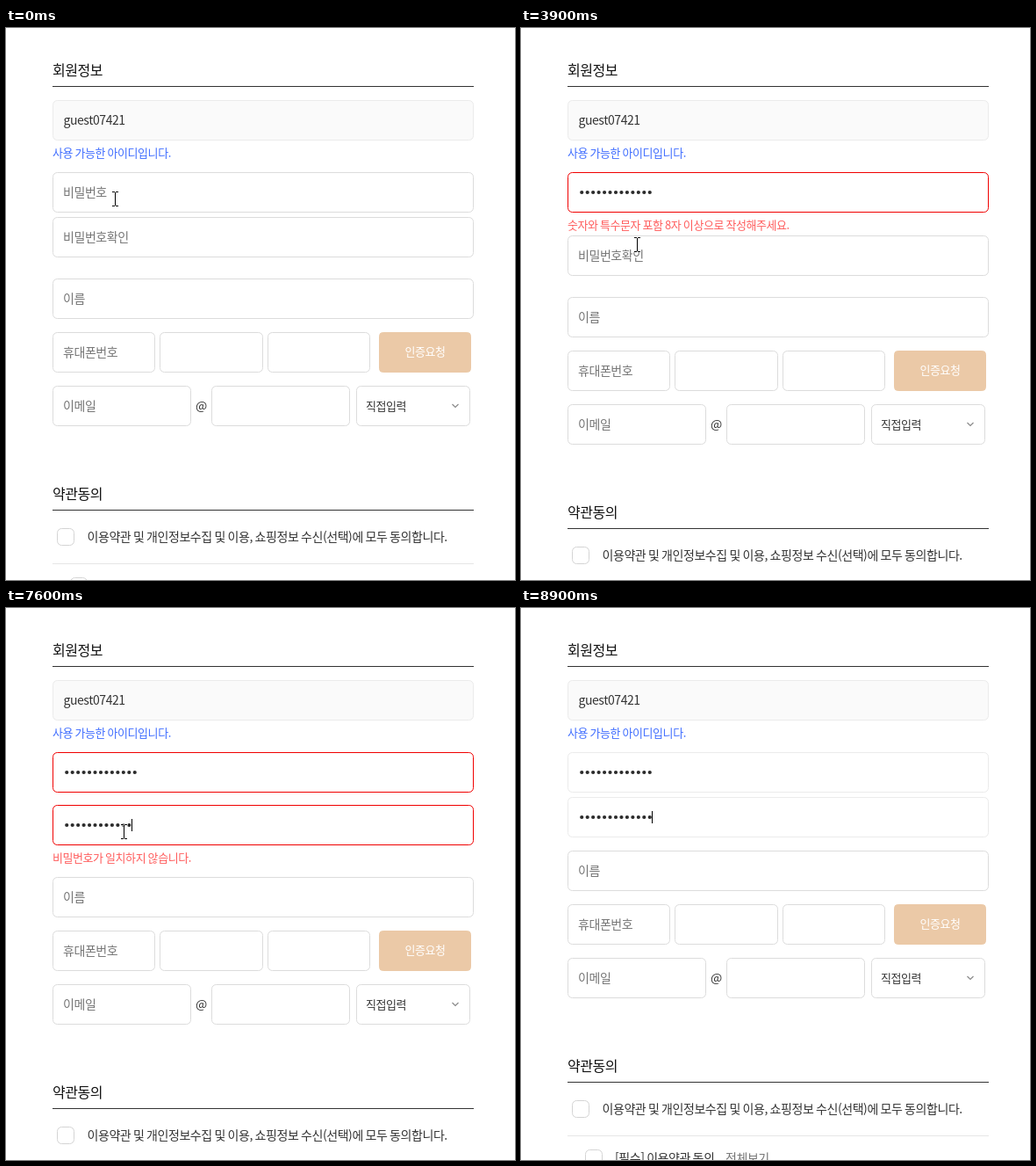
Recreate the animation shown at these times as an HTML page with a canvas. Size 580x628 px, loop 9200 ms.

```html
<!DOCTYPE html>
<html lang="ko">
<head>
<meta charset="utf-8">
<title>회원정보</title>
<style>
html, body { margin: 0; width: 100%; height: 100%; overflow: hidden; background: #fff; }
canvas { display: block; }
</style>
</head>
<body>
<canvas id="stage" width="580" height="628"></canvas>
<script>
const ctx = document.getElementById('stage').getContext('2d');
const LOOP = 9200, STEP = 100;
const FONT = '"Noto Sans CJK KR", "Noto Sans CJK", "Noto Sans", sans-serif';
const LEFT = 53, WIDTH = 480, FIELD = 46;
const GREY = '#dcdcdc', PALE = '#ebebeb', RED = '#f00000', HINT = '#757575';

// Key presses for the two password fields
const keys1 = [1400, 1500, 1600, 1700, 1800, 1900, 2000, 2000, 2700, 2800, 3000, 3100, 3100];
const keys2 = [5300, 5400, 5500, 5600, 5700, 5800, 5900, 6100, 6900, 7100, 7200, 7600, 7800];
const caretOn = [[500, 1000], [1400, 2600], [2700, 3700], [4300, 4900], [5300, 6700], [6900, 8400], [8900, LOOP]];
const SWAP = 4100, VALID = 7800;

// Error message block: top margin, line and bottom margin
const MSG = { top: 8, line: 12, bottom: 1 };
const EMPTY = MSG.top + MSG.bottom, FULL = EMPTY + MSG.line;

const clamp = v => Math.max(0, Math.min(1, v));
const progress = (t, from, to) => clamp((t - from) / (to - from));
const swing = p => 0.5 - Math.cos(Math.PI * p) / 2;
const mix = (a, b, p) => a + (b - a) * p;
const typed = (keys, t) => keys.filter(k => k <= t).length;

// Text is placed by its visual middle
function text(str, x, y, size = 14, color = '#333', weight = 300, align = 'left') {
  ctx.font = `${weight} ${size}px ${FONT}`;
  ctx.letterSpacing = '-0.44px';
  ctx.textAlign = align;
  ctx.fillStyle = color;
  ctx.fillText(str, x, Math.round(y + size * 0.37));
}

function box(x, y, w, h, border = GREY, fill = '#fff', radius = 5) {
  ctx.beginPath();
  ctx.roundRect(x + 0.5, y + 0.5, w - 1, h - 1, radius);
  ctx.fillStyle = fill;
  ctx.fill();
  ctx.strokeStyle = border;
  ctx.lineWidth = 1;
  ctx.stroke();
}

function input(x, y, w, hint = '', border = GREY) {
  box(x, y, w, FIELD, border);
  text(hint, x + 12, y + 23, 14, HINT);
}

function rule(y, color) {
  ctx.fillStyle = color;
  ctx.fillRect(LEFT, y, WIDTH, 1);
}

function password(y, hint, count, border, caret) {
  const x = 66, pitch = 6.46;
  input(LEFT, y, WIDTH, count ? '' : hint, border);
  ctx.fillStyle = '#2b2b2b';
  for (let i = 0; i < count; i++) {
    ctx.beginPath();
    ctx.arc(x + pitch * (i + 0.5), y + 23, 2.1, 0, Math.PI * 2);
    ctx.fill();
  }
  if (caret) {
    ctx.fillStyle = '#000';
    ctx.fillRect(Math.floor(x + pitch * count), y + 16, 1, 14);
  }
}

// Margins and line shrink together while the block slides
function message(str, y, open) {
  if (open <= 0) return;
  const top = y + MSG.top * open;
  ctx.save();
  if (open < 1) {
    ctx.beginPath();
    ctx.rect(0, top, 580, MSG.line * open);
    ctx.clip();
  }
  text(str, LEFT, top + MSG.line / 2, 13, '#ff5c5c');
  ctx.restore();
}

function contact(y) {
  input(LEFT, y, WIDTH, '이름');

  const phone = y + 61;
  input(53, phone, 117, '휴대폰번호');
  input(175, phone, 118);
  input(298, phone, 117);
  box(425, phone, 105, FIELD, '#ebc9a7', '#ebc9a7', 4);
  text('인증요청', 477.5, phone + 22.5, 13, '#fff', 400, 'center');

  const mail = y + 122;
  input(53, mail, 158, '이메일');
  text('@', 216, mail + 23);
  input(234, mail, 158);
  box(399, mail, 130, FIELD);
  text('직접입력', 410, mail + 23, 13);
  ctx.beginPath();
  ctx.moveTo(508.5, mail + 21);
  ctx.lineTo(512, mail + 24.5);
  ctx.lineTo(515.5, mail + 21);
  ctx.strokeStyle = '#8a8a8a';
  ctx.lineWidth = 1.2;
  ctx.stroke();
}

function terms(y) {
  text('약관동의', LEFT, y, 16, '#111', 400);
  rule(y + 18, '#333');
  box(58, y + 39, 20, 20, '#d4d4d4');
  text('이용약관 및 개인정보수집 및 이용, 쇼핑정보 수신(선택)에 모두 동의합니다.', 92.5, y + 49);
  rule(y + 79, '#e6e6e6');
  box(73, y + 95, 20, 20, '#d4d4d4');
  text('[필수] 이용약관 동의', 107, y + 104.5);
  text('전체보기', 233, y + 104.5, 14, HINT);
}

function pointer(t) {
  const nudge = progress(t, 300, 500);
  const down = swing(progress(t, 3600, 4000));
  const leave = progress(t, 8000, 8600) ** 2;
  const x = Math.round(mix(124, 123, nudge) + 11 * down);
  const y = Math.round(mix(194, 196, nudge) + 58 * down - 275 * leave);
  const bars = [[0, -7, 1, 15], [-3, -8, 3, 1], [1, -8, 3, 1], [-3, 8, 3, 1], [1, 8, 3, 1]];
  ctx.fillStyle = '#fff';
  for (const [dx, dy, w, h] of bars) ctx.fillRect(x + dx - 0.5, y + dy - 0.5, w + 1, h + 1);
  ctx.fillStyle = '#000';
  for (const [dx, dy, w, h] of bars) ctx.fillRect(x + dx, y + dy, w, h);
}

function draw(t) {
  ctx.fillStyle = '#fff';
  ctx.fillRect(0, 0, 580, 628);

  const opening = swing(progress(t, 1440, 1840));
  const left = 1 - swing(progress(t, 7760, 8160));
  const swapped = t >= SWAP;
  const msg1 = swapped ? EMPTY * left : FULL * opening;
  const msg2 = swapped ? FULL * left : EMPTY;

  const first = 164;
  const second = Math.round(first + FIELD + 5 + msg1);
  const name = Math.round(first + FIELD * 2 + 20 + msg1 + msg2);
  const border1 = t >= VALID ? PALE : t >= 1500 ? RED : GREY;
  const border2 = t >= VALID ? PALE : swapped ? RED : GREY;
  const caret = caretOn.some(([on, off]) => t >= on && t < off);

  text('회원정보', LEFT, 48, 16, '#111', 400);
  rule(66, '#333');
  box(LEFT, 82, WIDTH, FIELD, PALE, '#fafafa');
  text('guest07421', 65.5, 105);
  text('사용 가능한 아이디입니다.', LEFT, 142, 13, '#406eff');

  password(first, '비밀번호', typed(keys1, t), border1, caret && !swapped);
  if (!swapped) message('숫자와 특수문자 포함 8자 이상으로 작성해주세요.', first + FIELD, opening);
  password(second, '비밀번호확인', typed(keys2, t), border2, caret && swapped);
  if (swapped) message('비밀번호가 일치하지 않습니다.', second + FIELD, left);

  contact(name);
  terms(name + 245);
  pointer(t);
}

const start = performance.now();
function frame() {
  const t = (performance.now() - start) % LOOP;
  draw(Math.floor(t / STEP) * STEP);
  requestAnimationFrame(frame);
}
frame();
</script>
</body>
</html>
```
